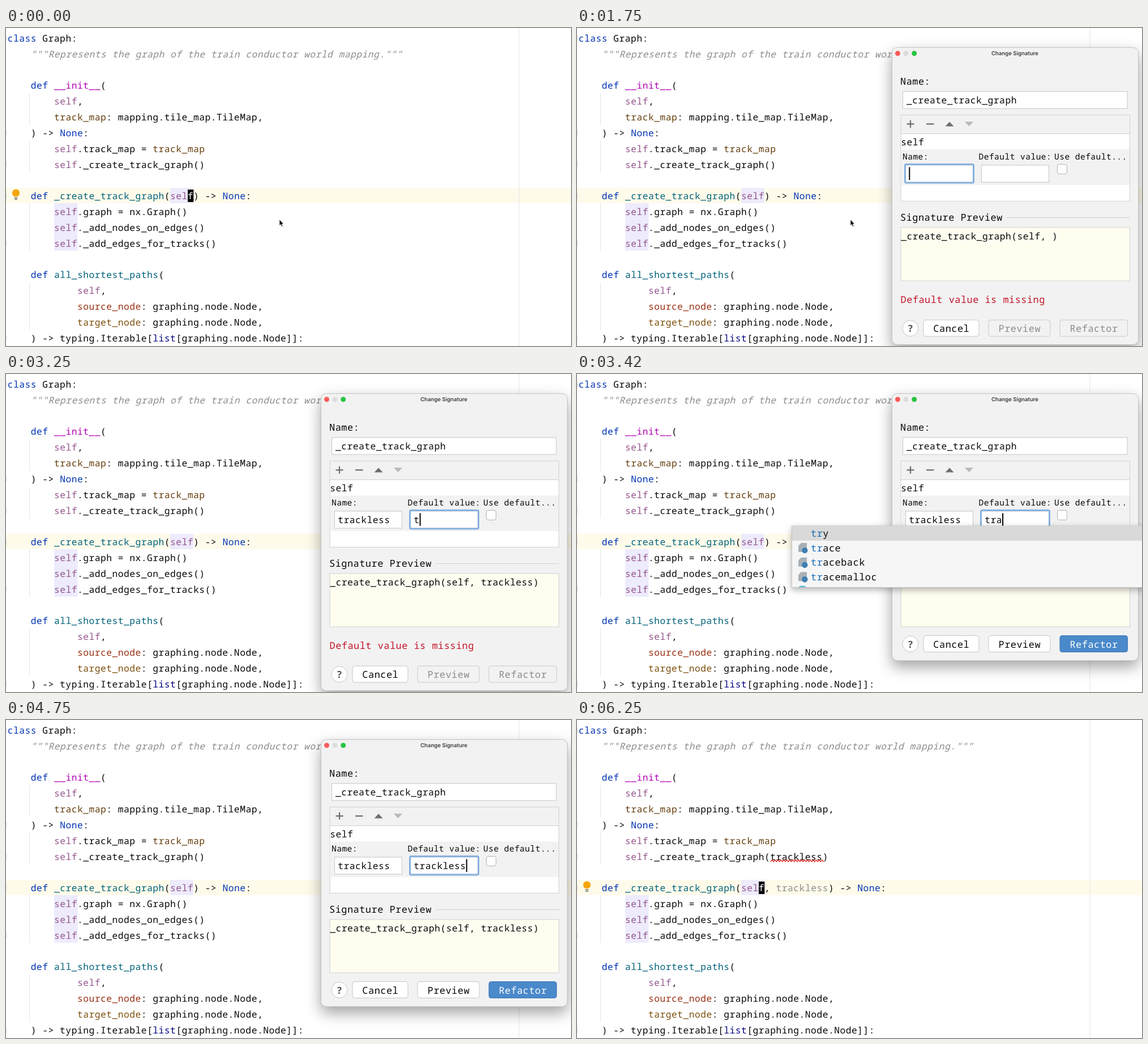
Recreate the animation shown at these times as an HTML page. Size 998 px wide and 561 px high, loop 6440 ms.

```html
<!DOCTYPE html>
<html lang="en">
<head>
<meta charset="utf-8">
<title>Change Signature</title>
<style>
html, body { margin: 0; width: 100%; height: 100%; overflow: hidden; background: #fff; }
svg { display: block; width: 998px; height: 561px; }
text { font: 16.29px "Noto Sans Mono", monospace; letter-spacing: .03em; white-space: pre; fill: #080808; text-rendering: geometricPrecision; }
text.ui { font-size: 16.9px; }
text.small { font-size: 14.6px; }
text.title { font: 600 9.6px Inter, sans-serif; letter-spacing: 0; fill: #3c3c3c; text-anchor: middle; }
text.mid { text-anchor: middle; }
.k { fill: #0033b3; } .f { fill: #00627a; } .m { fill: #b200b2; } .s { fill: #94558d; }
.p { fill: #66400f; } .r { fill: #993012; } .t { fill: #7d4f0c; } .b { fill: #000080; }
.g { fill: #8c8c8c; } .c { fill: #8c8c8c; font-style: italic; } .h { fill: #1a6fb8; }
.box { fill: #fff; stroke: #c6c6c6; }
.ring { fill: none; stroke: #87b1e0; stroke-width: 3; }
#frame { filter: drop-shadow(0 11px 13px rgba(0,0,0,.36)); }
#menu { filter: drop-shadow(0 4px 6px rgba(0,0,0,.3)); }
.off rect { fill: #f2f2f2; stroke: #c9c9c9; }
.off text { fill: #8c8c8c; }
</style>
</head>
<body>
<svg id="stage" viewBox="0 0 998 561"></svg>
<script>
const LOOP = 6440, ADV = 10.26, LEFT = 2.8, ROW = 27.84;
const WORD = 'trackless';

// k{def} becomes a coloured span of class k
const paint = s => s.replace(/(\w)\{(.*?)\}/g, '<tspan class="$1">$2</tspan>');
const colX = c => LEFT + c * ADV;
const rowY = r => 23.8 + r * ROW;
const text = (x, y, s, cls = '', more = '') => `<text x="${x}" y="${y}" class="${cls}" ${more}>${paint(s)}</text>`;
const code = (row, col, s, id = '') => text(colX(col), rowY(row), s, '', id && `id="${id}"`);
const rect = (x, y, w, h, fill, more = '') => `<rect x="${x}" y="${y}" width="${w}" height="${h}" fill="${fill}" ${more}/>`;
const box = (x, y, w, h, r = 0, more = '') => `<rect class="box" x="${x}" y="${y}" width="${w}" height="${h}" rx="${r}" ${more}/>`;
const path = (d, more) => `<path d="${d}" ${more}/>`;
const dot = (x, y, r, fill, more = '') => `<circle cx="${x}" cy="${y}" r="${r}" fill="${fill}" ${more}/>`;
const group = (id, ...parts) => `<g id="${id}">${parts.join('')}</g>`;

const editor = [
  rect(0, 282, 998, 27, '#fffbeb'),
  rect(290, 282, 41, 27, '#edebfc'),
  rect(85, 309, 41.5, 84, '#edebfc'),
  rect(905.5, 0, 1, 561, '#e4e4e4'),
  ...[[115, 56], [199, 56], [309, 84], [449, 84]].map(([y, h]) => rect(41, y, 1, h, '#e4e4e4')),
  ...[0, 6, 8, 10, 13, 19].map(r => rect(0, rowY(r) - 11, 1, 10, '#d8d8d8')),
  code(0, 0, 'k{class} Graph:'),
  code(1, 4, 'c{"""Represents the graph of the train conductor world mapping."""}'),
  code(3, 4, 'k{def} m{__init__}('),
  code(4, 8, 's{self},'),
  code(5, 8, 'p{track_map}: mapping.tile_map.TileMap,'),
  code(6, 4, ') -> k{None}:'),
  code(7, 8, 's{self}.track_map = p{track_map}'),
  code(8, 8, '', 'call'),
  code(10, 4, '', 'sig'),
  code(11, 8, 's{self}.graph = nx.Graph()'),
  code(12, 8, 's{self}._add_nodes_on_edges()'),
  code(13, 8, 's{self}._add_edges_for_tracks()'),
  code(15, 4, 'k{def} f{all_shortest_paths}('),
  code(16, 12, 's{self},'),
  code(17, 12, 'r{source_node}: graphing.node.Node,'),
  code(18, 12, 't{target_node}: graphing.node.Node,'),
  code(19, 4, ') -> typing.Iterable[b{list}[graphing.node.Node]]:'),
  path('M342 250' + 'l2.6 -3.2l2.6 3.2'.repeat(18), 'id="wave" fill="none" stroke="#e0201c" stroke-width="1.3"'),
  group('bulb', dot(17.5, 291, 6.6, '#f4a60c'),
    path('M14.5 299.5h6M15 302.3h5', 'stroke="#6e6e6e" stroke-width="1.5"')),
  group('caret', rect(321, 285, 10.3, 22, '#000'), text(colX(31), rowY(10), 'f', '', 'style="fill:#fff"')),
  path('M483 338v10.5l2.4-2.1 1.7 3.9 1.8-.8-1.7-3.7h3.2z', 'id="mouse" stroke="#fff" stroke-width=".7"')
];

const button = (id, x, w, label, style = '') =>
  group(id, box(x, 461.5, w, 29, 4, style && 'style="fill:#4a89ca;stroke:#3d78b8"'),
    text(x + w / 2 + .3, 482.5, label, 'ui mid', style));
const field = (id, x) => group(id + 'Field', box(x + .5, 242, 119, 30),
  text(x + 6.3, 262.8, '', '', `id="${id}"`),
  `<rect id="${id}Ring" class="ring" x="${x - .5}" y="240.5" width="121" height="32.5" rx="2"/>`);

const dialog = group('dialog',
  rect(556.5, 34.5, 435, 471, '#f2f2f2', 'id="frame" rx="9" stroke="#c2c2c2"'),
  dot(566.5, 44.7, 4.5, '#fc5b57'), dot(581, 44.7, 4.5, '#dcdcdc'), dot(595.7, 44.7, 4.5, '#28c440'),
  text(773.5, 47.8, 'Change Signature', 'title'),
  text(571, 100, 'Name:', 'ui'),
  box(575.5, 112, 396.5, 30),
  text(582, 133, '_create_track_graph'),
  rect(572, 153.5, 404.5, 33, '#f2f2f2', 'stroke="#d1d1d1"'),
  box(572, 186.5, 404.5, 119, 0, 'style="stroke:#d1d1d1"'),
  path('M582.5 169.3h13M589 162.8v13M617 169.3h13.5', 'stroke="#6e6e6e" stroke-width="2.2"'),
  path('M650.5 173.5h15l-7.5-8z', 'id="up"'),
  path('M685 165.3h15l-7.5 8z', 'fill="#b9b9b9"'),
  rect(572, 187, 404, 27.5, '#2675bf', 'id="picked"'),
  text(572.3, 207.3, 'self', '', 'id="first"'),
  group('param', rect(572.5, 214.5, 403.5, 62.5, '#f2f2f2'),
    text(575, 231.5, 'Name:', 'small'),
    text(709.5, 231.5, 'Default value:', 'small'),
    text(843, 231.5, 'Use default...', 'small'),
    field('name', 580), field('value', 714),
    box(848.5, 240.5, 17, 17, 3, 'style="stroke:#b0b0b0"'),
    rect(0, 245.5, 2, 22.5, '#000', 'id="bar"')),
  text(571, 340, 'Signature Preview', 'ui'),
  rect(759, 334, 217.5, 1, '#cfcfcf'),
  rect(572, 352, 404.5, 94, '#fffdf0', 'stroke="#d1d1d1"'),
  text(572.3, 373, '', '', 'id="preview"'),
  text(571.5, 485, 'Default value is missing', 'ui', 'id="error" style="fill:#c4162a"'),
  group('foot', dot(589, 476.3, 14, '#fff', 'stroke="#c6c6c6"'),
    text(589.2, 482.8, '?', 'ui mid', 'style="fill:#555;font-weight:600"'),
    button('cancel', 612, 98, 'Cancel'),
    button('look', 727, 109, 'Preview'),
    button('apply', 853, 119.5, 'Refactor', 'style="fill:#fff"')));

const item = (i, rest) => text(413, 287.2 + i * 25.6, `h{tr}${rest}`, 'ui') +
  (i ? path(`M396 ${272.5 + i * 25.6}h10v16h-15v-11z`, 'fill="#a9b1b7"') +
    dot(402.3, 285.5 + i * 25.6, 5.2, '#3e7fb3') : '');
const popup = group('popup',
  rect(379.5, 268, 640, 108.5, '#f6f6f6', 'id="menu" stroke="#c4c4c4"'),
  rect(380, 268.5, 640, 25.5, '#d9d9d9'),
  ['y', 'ace', 'aceback', 'acemalloc'].map((s, i) => item(i, s)).join(''),
  path('M391 376a8 5 0 0 1 14 0z', 'fill="#53b5d6"'));

document.getElementById('stage').innerHTML = editor.join('') + dialog + popup;
const el = Object.fromEntries([...document.querySelectorAll('[id]')].map(e => [e.id, e]));

const SIGS = [') -> k{None}:', ', trackless) -> k{None}:', ', g{trackless}) -> k{None}:'];
const typing = (key, times) => times.map((t, i) => [t, { [key]: i + 1, bar: 1 }]);
const steps = [
  [0, { caret: 1, bulb: 1, mouse: 1, dialog: 0, param: 0, tall: 0, popup: 0, focus: 'name',
        name: 0, value: 0, seen: 0, bar: 1, sig: 0 }],
  [330, { caret: 0 }],
  [670, { dialog: 1, bulb: 0 }],
  [1670, { param: 1 }],
  [1750, { tall: 1 }],
  [2080, { mouse: 0 }],
  ...typing('name', [2080, 2210, 2290, 2380, 2460, 2540, 2630, 2750, 2830]),
  ...[2130, 2250, 2330, 2420, 2500, 2580, 2670, 2790, 2880].map((t, i) => [t, { seen: i + 1 }]),
  [3000, { focus: 'value' }],
  ...typing('value', [3250, 3330, 3420, 3500, 3580, 3670, 3750, 3960, 4000]),
  [3330, { tall: 0 }],
  [3380, { popup: 1 }],
  [3620, { popup: 0 }],
  [4420, { bar: 0 }],
  [4750, { bar: 1 }],
  [4920, { dialog: 0, caret: 1 }],
  [4960, { sig: 1 }],
  [5210, { sig: 2 }],
  [5580, { bulb: 1 }],
  [5920, { caret: 0 }],
  [6250, { caret: 1 }]
].sort((a, b) => a[0] - b[0]);

const show = (id, on) => { el[id].style.display = on ? '' : 'none'; };

function render(s) {
  for (const id of ['caret', 'bulb', 'mouse', 'dialog', 'param', 'popup', 'bar']) show(id, s[id]);
  show('picked', !s.param);
  show('error', s.tall);
  show('wave', s.sig === 2);
  el.first.style.fill = s.param ? '' : '#fff';
  el.up.setAttribute('fill', s.param ? '#6e6e6e' : '#b9b9b9');
  el.frame.setAttribute('height', s.tall ? 524 : 471);
  el.foot.setAttribute('transform', `translate(0 ${s.tall ? 53.5 : 0})`);
  for (const id of ['look', 'apply']) {
    el[id].classList.toggle('off', !!s.tall);
    if (id === 'apply') {
      const [back, label] = el[id].children;
      back.style.fill = s.tall ? '#f2f2f2' : '#4a89ca';
      back.style.stroke = s.tall ? '#c9c9c9' : '#3d78b8';
      label.style.fill = s.tall ? '#8c8c8c' : '#fff';
    }
  }
  for (const id of ['name', 'value']) {
    el[id].textContent = WORD.slice(0, s[id]);
    show(id + 'Ring', s.focus === id);
  }
  el.bar.setAttribute('x', (s.focus === 'name' ? 586.3 : 720.3) + s[s.focus] * ADV);
  el.preview.textContent = `_create_track_graph(self${s.param ? ', ' + WORD.slice(0, s.seen) : ''})`;
  el.call.innerHTML = paint(`s{self}._create_track_graph(${s.sig ? WORD : ''})`);
  el.sig.innerHTML = paint('k{def} f{_create_track_graph}(s{self}' + SIGS[s.sig]);
}

const start = performance.now();
let last = 0;
function tick() {
  const t = (performance.now() - start) % LOOP;
  const due = steps.filter(step => step[0] <= t);
  if (due.length !== last) {
    last = due.length;
    render(Object.assign({}, ...due.map(step => step[1])));
  }
  requestAnimationFrame(tick);
}
tick();
</script>
</body>
</html>
```
